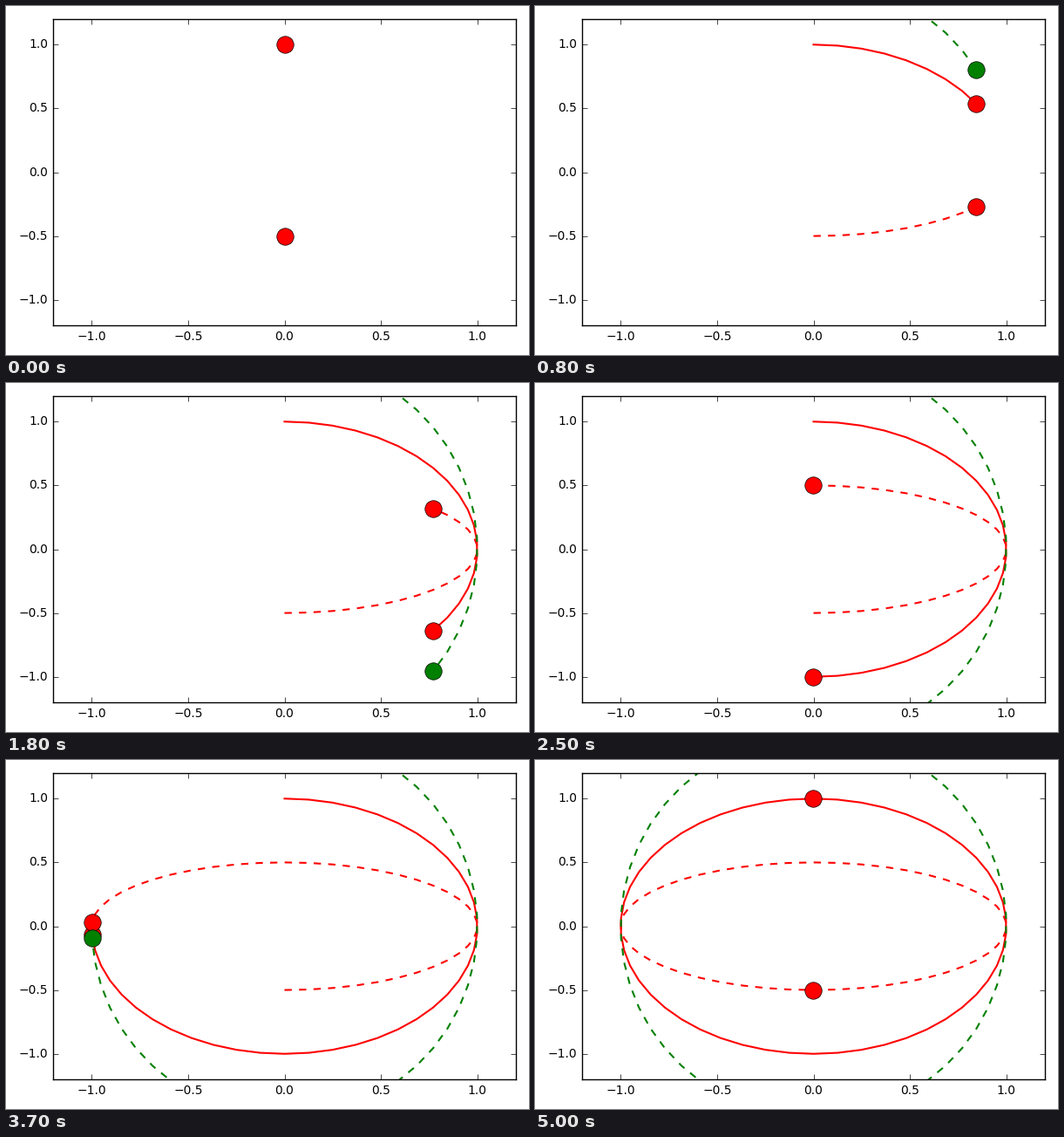
These frames come from a looping animation (600 px wide and 400 px high, 5100 ms). A matplotlib script:

```python
import numpy as np
import matplotlib.pyplot as plt
from matplotlib.animation import FuncAnimation

plt.style.use("classic")
plt.rcParams.update({"font.family": "DejaVu Sans", "font.size": 10})

WIDTH, HEIGHT, DPI = 600, 400, 100
FRAMES, INTERVAL = 51, 100
LEFT, RIGHT, TOP, BOTTOM = 54, 585, 15, 366
TICKS = [-1, -0.5, 0, 0.5, 1]

# (vertical radius, colour, line style) of each ellipse
ORBITS = [(1.0, "red", "-"), (-0.5, "red", "--"), (1.5, "green", "--")]

angle = np.linspace(0, 2 * np.pi, FRAMES)
x, y = np.sin(angle), np.cos(angle)

fig = plt.figure(figsize=(WIDTH / DPI, HEIGHT / DPI), dpi=DPI, facecolor="white")
ax = fig.add_axes([LEFT / WIDTH, 1 - BOTTOM / HEIGHT,
                   (RIGHT - LEFT) / WIDTH, (BOTTOM - TOP) / HEIGHT])
ax.set(xlim=(-1.2, 1.2), ylim=(-1.2, 1.2), xticks=TICKS, yticks=TICKS)

trails = [ax.plot([], [], color=color, ls=style, lw=1.5)[0]
          for _, color, style in ORBITS]
dots = [ax.plot([], [], "o", color=color, ms=14, mec="black", mew=0.5)[0]
        for _, color, _ in ORBITS]


def update(i):
    for (radius, _, _), trail, dot in zip(ORBITS, trails, dots):
        trail.set_data(x[:i + 1], radius * y[:i + 1])
        dot.set_data([x[i]], [radius * y[i]])
    return trails + dots


anim = FuncAnimation(fig, update, frames=FRAMES, interval=INTERVAL,
                     init_func=lambda: update(0), repeat=True, repeat_delay=0)
plt.show()
```
